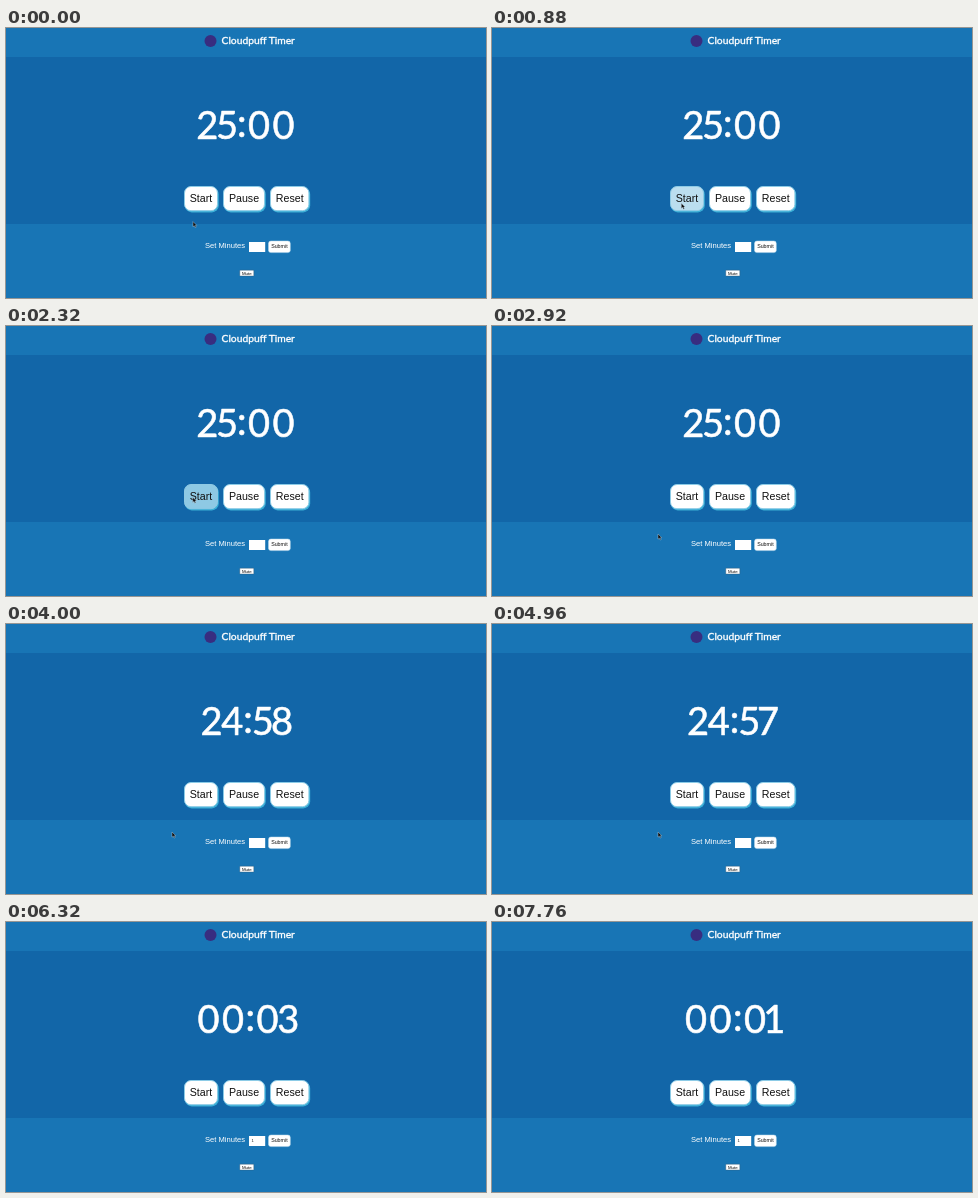
An HTML page that plays this animation: 480 px wide and 270 px high, repeating every 8000 ms.

```html
<!DOCTYPE html>
<html lang="en">
<head>
<meta charset="utf-8">
<title>Cloudpuff Timer</title>
<style>
  html, body { margin: 0; width: 100%; height: 100%; overflow: hidden; background: #1875b5; }
  svg { display: block; width: 100%; height: 100%; font-family: "Liberation Sans", Arial, sans-serif; }
  .hand { font-family: Lato, sans-serif; fill: #fff; stroke: #fff; stroke-linejoin: round; }
  .title { font-size: 10.3px; stroke-width: .35; }
  .clock { font-size: 38px; stroke-width: .6; text-anchor: middle; }
  .button text { font-size: 10.65px; text-anchor: middle; fill: #111; }
  .shade { fill: #3aaed6; }
  .face { fill: #fff; stroke: #8ccbe6; }
</style>
</head>
<body>
<svg viewBox="0 0 480 270">
  <rect width="480" height="270" fill="#1875b5"/>
  <rect y="29" width="480" height="167" fill="#1266a8"/>

  <circle cx="204.5" cy="13" r="6" fill="#382d80"/>
  <text class="hand title" x="215.5" y="16.3">Cloudpuff Timer</text>

  <text class="hand clock" id="clock">25:00</text>
  <g id="buttons"></g>

  <text x="199" y="220.4" font-size="7.6" fill="#fff">Set Minutes</text>
  <rect x="243" y="214" width="16.2" height="10" fill="#fff"/>
  <text id="minutes" x="245.6" y="220.4" font-size="4.2" fill="#222">1</text>
  <path id="spinner" d="M253.3 218.2l1.2-1.6 1.2 1.6zM253.3 219.6l1.2 1.6 1.2-1.6z" fill="#555"/>
  <rect x="262.5" y="213" width="21.8" height="11.6" rx="2.4" fill="#fff" stroke="#b9d9ea" stroke-width=".5"/>
  <text x="273.4" y="220.2" font-size="5.3" text-anchor="middle" fill="#111">Submit</text>
  <rect x="233.8" y="242.2" width="14" height="5.8" rx=".6" fill="#fff" stroke="#35566e" stroke-width=".4"/>
  <text x="240.8" y="246.7" font-size="4.4" text-anchor="middle" fill="#000">Mute</text>

  <path id="cursor" d="M0 0V5.2L1.3 4.1 2.1 6 3.1 5.6 2.3 3.8H3.8z" fill="#0c0c0c" stroke="#c4d6e2" stroke-width=".4"/>
</svg>
<script>
const LOOP = 8000;
const $ = id => document.getElementById(id);

// Advance width of each clock character.
const ADVANCE = { 0: 24.5, 1: 14, 2: 20, 3: 17, 4: 21.5, 5: 19.5, 6: 19.5, 7: 18, 8: 19, 9: 19.5, ":": 10 };

const TICKS = [
  [0, "25:00"], [3040, "24:59"], [4000, "24:58"], [4960, "24:57"],
  [5920, "24:56"], [6120, "00:03"], [6760, "00:02"], [7720, "00:01"]
];

// Cursor stops: time, x, y.
const PATH = [
  [0, 187, 193.6], [520, 187, 193.6], [1040, 190, 170], [1440, 190, 170],
  [1960, 188, 169], [2280, 188, 169], [2560, 166, 208], [5600, 166, 208],
  [5760, 225, 217], [5920, 251, 217]
];
const CUT = 6120;

const clamp = v => Math.min(1, Math.max(0, v));
const ease = v => v * v * (3 - 2 * v);
const mix = (a, b, k) => a + (b - a) * k;

function addButton(label, x, w) {
  $("buttons").insertAdjacentHTML("beforeend", `<g class="button">
    <rect class="shade" x="${x + 0.8}" y="159.4" width="${w}" height="25" rx="7"/>
    <rect class="face" x="${x + 0.5}" y="158.5" width="${w - 1}" height="24.2" rx="6.5"/>
    <text x="${x + w / 2}" y="174.2">${label}</text></g>`);
}

function showClock(text) {
  const clock = $("clock");
  if (clock.dataset.shown === text) return;
  const chars = [...text];
  let x = 240.6 - chars.reduce((sum, c) => sum + ADVANCE[c], 0) / 2;
  const xs = chars.map(c => {
    const mid = x + ADVANCE[c] / 2;
    x += ADVANCE[c];
    return mid;
  });
  clock.setAttribute("x", xs.join(" "));
  clock.setAttribute("y", chars.map(c => c === ":" ? 109 : 111.4).join(" "));
  clock.textContent = clock.dataset.shown = text;
}

function cursorAt(t) {
  const i = PATH.findIndex(p => p[0] > t);
  if (i < 0) return PATH[PATH.length - 1].slice(1);
  const [t0, x0, y0] = PATH[i - 1], [t1, x1, y1] = PATH[i];
  const k = ease((t - t0) / (t1 - t0));
  return [mix(x0, x1, k), mix(y0, y1, k)];
}

function draw(t) {
  showClock(TICKS.filter(tick => tick[0] <= t).pop()[1]);

  const [x, y] = cursorAt(t);
  $("cursor").setAttribute("transform", `translate(${x} ${y})`);
  $("cursor").style.display = t < CUT ? "" : "none";

  const hover = clamp((t - 760) / 200) * (1 - clamp((t - 2360) / 200));
  const tint = (a, b) => `rgb(${a.map((v, i) => Math.round(mix(v, b[i], hover)))})`;
  startFace.style.fill = tint([255, 255, 255], [142, 201, 228]);
  startFace.style.stroke = tint([140, 203, 230], [142, 201, 228]);

  $("spinner").style.display = t >= 5720 && t < CUT ? "" : "none";
  $("minutes").style.display = t >= CUT ? "" : "none";
}

addButton("Start", 178, 34);
addButton("Pause", 217, 42);
addButton("Reset", 264, 39.4);
const startFace = document.querySelector(".face");

const begin = performance.now();
function frame() {
  draw((performance.now() - begin) % LOOP);
  requestAnimationFrame(frame);
}
frame();
</script>
</body>
</html>
```
